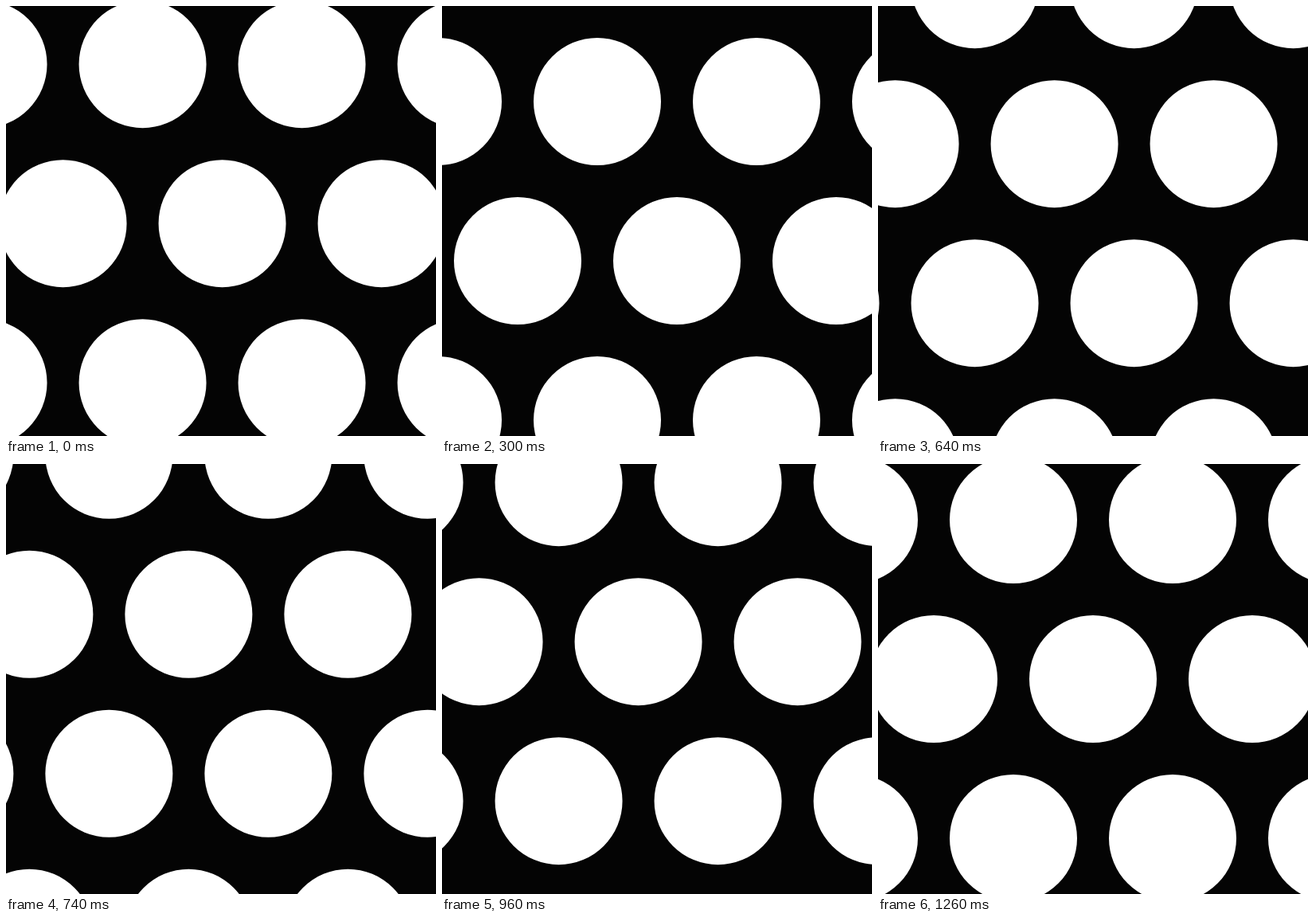
An HTML page with a canvas that plays this animation: 540x540 px, repeating every 1280 ms.

```html
<!DOCTYPE html>
<html lang="en">
<head>
<meta charset="utf-8">
<title>Drifting dots</title>
<style>
  html, body { margin: 0; width: 100%; height: 100%; overflow: hidden; background: #040404; }
  canvas { display: block; }
</style>
</head>
<body>
<canvas id="stage" width="540" height="540"></canvas>
<script>
const SIZE = 540, SPACING = 200, RADIUS = 80;
const LOOP = 1280, STEP = 20, STEPS = LOOP / STEP;
const ctx = document.getElementById('stage').getContext('2d');

function draw(time) {
  // One loop moves the staggered lattice by half a column and one row.
  const progress = (Math.floor((time % LOOP) / STEP) + 1) / STEPS;
  const originX = SIZE / 2 + progress * SPACING / 2;
  const originY = SIZE / 2 + progress * SPACING;

  ctx.fillStyle = '#040404';
  ctx.fillRect(0, 0, SIZE, SIZE);
  ctx.fillStyle = '#fff';
  ctx.beginPath();
  for (let row = -3; row <= 2; row++) {
    const shift = row % 2 ? SPACING / 2 : 0;
    for (let col = -3; col <= 2; col++) {
      const x = originX + col * SPACING + shift;
      const y = originY + row * SPACING;
      ctx.moveTo(x + RADIUS, y);
      ctx.arc(x, y, RADIUS, 0, Math.PI * 2);
    }
  }
  ctx.fill();
}

const start = performance.now();
function tick() {
  draw(performance.now() - start);
  requestAnimationFrame(tick);
}
tick();
</script>
</body>
</html>
```
